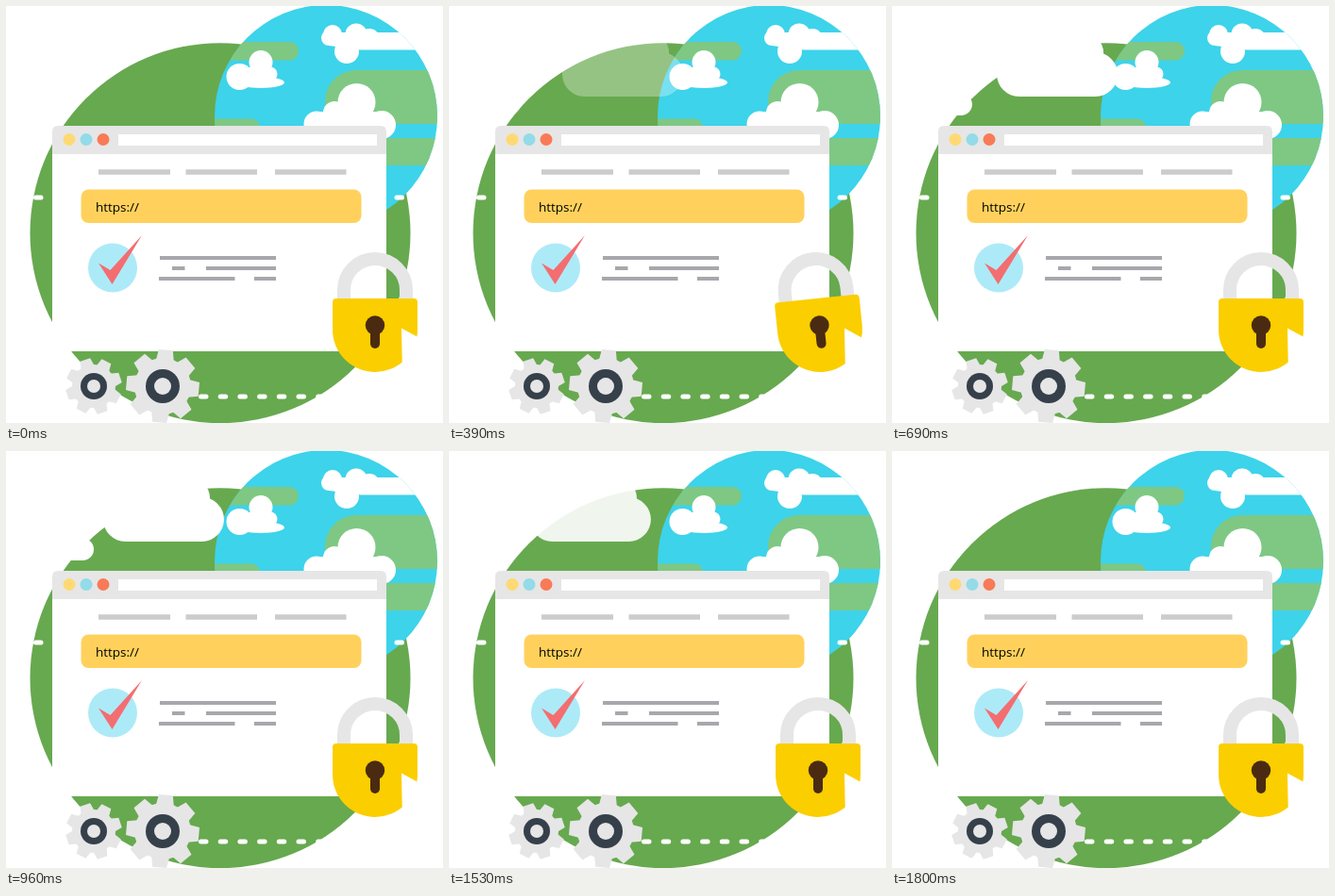
Write an HTML page that moves like this. It is 463x442 px and loops after 1.83 s.

```html
<!DOCTYPE html>
<html lang="en">
<head>
<meta charset="utf-8">
<title>Secure browsing</title>
<style>
html, body { margin: 0; width: 100%; height: 100%; overflow: hidden; background: #fff; }
svg { display: block; }
text { font: 13.5px "Open Sans", "Noto Sans", sans-serif; }
</style>
</head>
<body>
<svg width="463" height="442" viewBox="0 0 463 442">
  <defs>
    <clipPath id="globe"><circle cx="339" cy="117" r="118"/></clipPath>
  </defs>

  <circle cx="227" cy="240.7" r="201.5" fill="#67a94f"/>

  <g clip-path="url(#globe)">
    <rect x="220" width="240" height="240" fill="#3dd3ea"/>
    <g fill="#7ec884">
      <rect x="200" y="38" width="110" height="19.5" rx="9.7"/>
      <rect x="200" y="119.500" width="69" height="20" rx="9"/>
      <path d="M470 68H371A33 33 0 0 0 338 101V125H470Z"/>
      <rect x="386" y="140" width="90" height="29"/>
    </g>
    <g fill="#fff">
      <circle cx="247.500" cy="75" r="14"/>
      <circle cx="270" cy="59.500" r="12.500"/>
      <circle cx="280" cy="72" r="7.500"/>
      <ellipse cx="270" cy="81" rx="25" ry="6"/>
      <rect x="255" y="65" width="24" height="14"/>
      <circle cx="346" cy="30" r="10"/>
      <circle cx="342" cy="34" r="8"/>
      <circle cx="371" cy="30" r="11.500"/>
      <circle cx="385" cy="35" r="11"/>
      <circle cx="361" cy="48" r="13"/>
      <path d="M342 28H460V46.500H376L342 42Z"/>
      <circle cx="371.500" cy="102" r="20"/>
      <circle cx="398" cy="126" r="15"/>
      <circle cx="348" cy="113" r="12"/>
      <circle cx="329" cy="125" r="13.500"/>
      <rect x="329" y="112" width="69" height="20"/>
    </g>
  </g>

  <g id="big" fill="#fff">
    <rect x="103" y="49" width="128" height="47" rx="23.500"/>
    <path d="M103 74V28H194A22 22 0 0 1 216 50V60Z"/>
  </g>
  <rect id="small" x="0" y="92.500" width="93" height="23.500" rx="11.700" fill="#fff"/>

  <g stroke="#fff" stroke-width="5" stroke-linecap="round" fill="none">
    <path d="M31.500 203H37M414 203H419.500"/>
    <path d="M206.500 414H333" stroke-dasharray="5.500 15.200"/>
  </g>

  <rect x="49" y="150" width="354" height="216" fill="#fff"/>
  <path d="M49 157V133Q49 127 55 127H397Q403 127 403 133V157Z" fill="#e6e6e6"/>
  <rect x="119" y="136" width="274" height="12" fill="#fff"/>
  <circle cx="67" cy="141.500" r="6.500" fill="#ffd973"/>
  <circle cx="85" cy="141.500" r="6.500" fill="#93dbe8"/>
  <circle cx="103" cy="141.500" r="6.500" fill="#f97a57"/>
  <path d="M98 176H174M190.500 176H266M285 176H360.500" stroke="#ccc" stroke-width="5.500"/>
  <rect x="79.500" y="194.500" width="297" height="35.500" rx="8" fill="#ffd15c"/>
  <text x="95" y="217.500">https://</text>
  <circle cx="113" cy="277.500" r="26" fill="#adeaf7"/>
  <path d="M98 272.500L110.500 280L144 243L112.500 295Z" fill="#f46d70"/>
  <path d="M163 267H286M176 278H189.500M212 278H286M162 289H242.500M263 289H286" stroke="#a7a7ac" stroke-width="4"/>

  <g id="gears"></g>

  <g id="lock">
    <path d="M358 312V301A33 33 0 0 1 424 301V312" fill="none" stroke="#e6e6e6" stroke-width="14"/>
    <path d="M346 314Q346 310 350 310H432Q436 310 436 314V343A45 45 0 0 1 346 343Z" fill="#fbce00"/>
    <circle cx="391" cy="338.500" r="10.200" fill="#4a2b12"/>
    <rect x="386" y="338" width="10" height="25" rx="5" fill="#4a2b12"/>
  </g>
  <path d="M419 341.500L441 353.500V392H420Z" fill="#fff"/>
</svg>
<script>
const $ = id => document.getElementById(id);
const LOOP = 1830, STEP = 30;

function gear(x, y, root, tip, half, hub, phase) {
  let teeth = "";
  for (let i = 0; i < 8; i++) {
    teeth += `<path transform="rotate(${phase + i * 45})"
      d="M${root - 3} ${-half - 2}L${tip} ${-half}V${half}L${root - 3} ${half + 2}Z"/>`;
  }
  return `<g transform="translate(${x} ${y})" fill="#e6e6e6">${teeth}
    <circle r="${root}"/><circle r="${hub}" fill="#36404b"/><circle r="${hub / 2}"/></g>`;
}
$("gears").innerHTML = gear(93, 403, 23, 29.5, 5.5, 14, -108) + gear(166, 403, 30, 38.5, 7.5, 18, -85);

// Piecewise linear value through [time, value] pairs.
function track(t, keys) {
  if (t <= keys[0][0]) return keys[0][1];
  for (let i = 1; i < keys.length; i++) {
    const [t0, a] = keys[i - 1], [t1, b] = keys[i];
    if (t <= t1) return a + (b - a) * (t - t0) / (t1 - t0);
  }
  return keys[keys.length - 1][1];
}

const swing = [[240, 0], [390, -6], [540, 5.7], [630, 0]];
const fade = end => [[300, 0], [600, 1], [end - 300, 1], [end, 0]];

function place(id, dx, opacity) {
  $(id).setAttribute("transform", `translate(${dx} 0)`);
  $(id).setAttribute("opacity", opacity);
}

function draw(now) {
  const t = Math.floor(now % LOOP / STEP) * STEP;
  const drift = (t - 960) * 0.03;
  place("big", -drift, track(t, fade(1800)));
  place("small", drift, track(t, fade(1500)));
  $("lock").setAttribute("transform", `rotate(${track(t, swing)} 391 324)`);
}

const start = performance.now();
function tick() {
  draw(performance.now() - start);
  requestAnimationFrame(tick);
}
tick();
</script>
</body>
</html>
```
